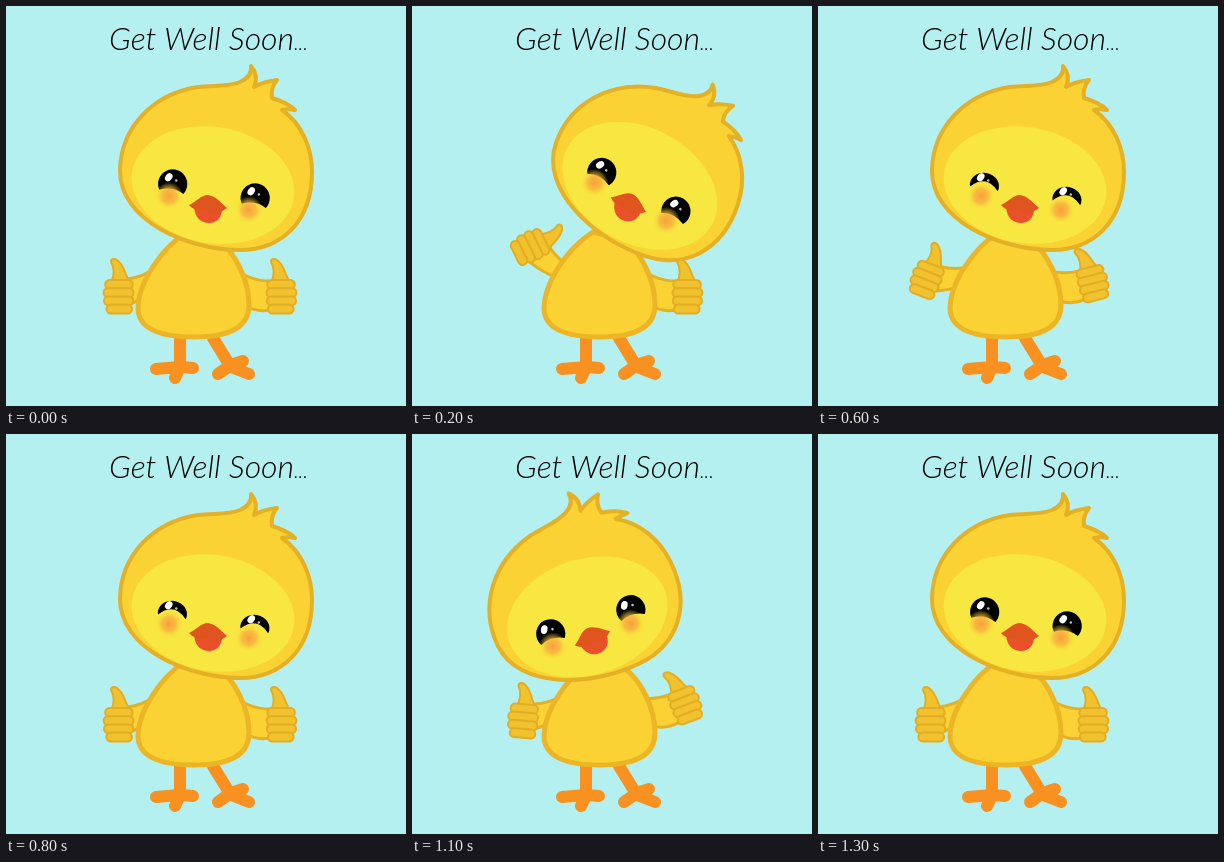
An HTML page that plays this animation: 400 by 400 pixels, repeating every 1400 ms.

```html
<!DOCTYPE html>
<html lang="en">
<head>
<meta charset="utf-8">
<title>Get Well Soon</title>
<style>
  html, body { margin: 0; width: 100%; height: 100%; overflow: hidden; background: #b5f0f0; }
  svg { display: block; width: 100%; height: 100%; }
  text { font: italic 300 32px Lato, "Open Sans", sans-serif; }
  .skin { fill: #fad233; stroke: #e4b026; stroke-width: 4; stroke-linejoin: round; }
  .body { stroke: #ebb526; stroke-width: 5; }
  .arm { stroke-width: 3; }
  .hand { fill: #f1c22d; stroke: #e2ad24; stroke-width: 2; stroke-linejoin: round; }
  .legs { fill: none; stroke: #f8911f; stroke-width: 12; stroke-linecap: round; stroke-linejoin: round; }
</style>
</head>
<body>
<svg viewBox="0 0 400 400">
  <defs>
    <radialGradient id="blush">
      <stop offset="0" stop-color="#f9a03a"/>
      <stop offset=".5" stop-color="#f9b040" stop-opacity=".8"/>
      <stop offset="1" stop-color="#f8e23f" stop-opacity="0"/>
    </radialGradient>
    <clipPath id="lid"><path class="lid"/></clipPath>
    <path id="thumb" d="M105 277C109 268 108 261 105 256C105 252 110 252 113 256C119 261 119 270 124 276Z"/>
    <g id="fist"></g>
    <g id="eye">
      <path class="lid"/>
      <g clip-path="url(#lid)" fill="#fff">
        <ellipse cx="-5" cy="-4" rx="3.3" ry="4.4" transform="rotate(28 -5 -4)"/>
        <circle cx="3" cy="-2" r="1.3" opacity=".75"/>
      </g>
    </g>
    <g id="cheek"><circle r="14" fill="url(#blush)"/></g>
  </defs>

  <rect width="400" height="400" fill="#b5f0f0"/>
  <text x="103" y="44">Get Well Soon<tspan font-size="20">...</tspan></text>

  <g class="legs">
    <path d="M174 332V360M150 363L174 361L169 372M176 361L187 362"/>
    <path d="M207 332L223 358M212 368L225 359L237 355M225 361L243 368"/>
  </g>

  <g id="left">
    <path class="skin arm" d="M163 245C157 258 143 270 122 273L127 297Q140 291 152 280Z"/>
    <use href="#thumb" class="hand"/>
    <use href="#fist" class="hand"/>
  </g>
  <g id="right">
    <path class="skin arm" d="M226 260C238 271 250 275 264 275V304Q250 307 236 298Z"/>
    <use href="#thumb" class="hand" x="160"/>
    <use href="#fist" class="hand" transform="matrix(-1 0 0 1 388 0)"/>
  </g>

  <path class="skin body" d="M181 226C154 243 132 278 132 303C133 325 158 331 188 331C219 331 243 323 243 299C243 274 229 246 212 234Z"/>

  <g id="head">
    <path class="skin" d="M114 164C115 122 146 88 192 81C208 79 222 81 234 76C243 72 246 67 245 60C251 67 251 74 248 81C256 76 263 75 271 74C266 80 265 86 266 92C273 94 283 98 289 104C284 103 280 103 276 104C296 118 306 142 306 166C306 217 274 244 234 244C181 244 113 214 114 164Z"/>
    <ellipse cx="207" cy="179" rx="82" ry="58" transform="rotate(9.7 207 179)" fill="#f8e740"/>
    <use href="#eye" transform="translate(167 176) rotate(9.7)"/>
    <use href="#eye" transform="translate(249.5 190) rotate(9.7)"/>
    <use href="#cheek" x="163" y="190"/>
    <use href="#cheek" x="243" y="204"/>
    <path d="M188 201C189 212 195 217 203 217C211 217 216 211 216 203Z" fill="#ea512b"/>
    <path d="M183 199C190 196 195 189 202 189C210 190 215 197 221 202C213 208 207 209 203 206C196 204 189 206 183 199Z" fill="#e0541f"/>
  </g>
</svg>
<script>
  const LOOP = 1400, STEP = 100;
  const $ = id => document.getElementById(id);
  const lids = document.querySelectorAll(".lid");

  // Four stacked fingers, longest in the middle
  for (let i = 0; i < 4; i++) {
    const finger = document.createElementNS("http://www.w3.org/2000/svg", "rect");
    const inset = (i - 1.3) ** 2;
    const box = { x: 97.5 + inset, y: 274 + 8.2 * i, width: 30 - 1.5 * inset, height: 9, rx: 4.5 };
    for (const key in box) finger.setAttribute(key, box[key]);
    $("fist").append(finger);
  }

  // Rises from 0 to 1 at the peak, then falls back to 0
  function pulse(t, peak, rise, fall = rise) {
    return Math.max(0, 1 - (t < peak ? (peak - t) / rise : (t - peak) / fall));
  }

  const mix = (a, b, u) => a + (b - a) * u;

  function eyePath(shut) {
    const rx = 14.6, ry = mix(14.6, 12.5, shut);
    const w = mix(12.2, 14, shut), y = mix(10, 7, shut);
    return `M${-w} ${y}A${rx} ${ry} 0 1 1 ${w} ${y}Q0 ${mix(4, -8, shut)} ${-w} ${y}Z`;
  }

  function turn(id, angle, x, y, dx = 0, dy = 0) {
    $(id).setAttribute("transform", `translate(${dx} ${dy}) rotate(${angle} ${x} ${y})`);
  }

  function draw(time) {
    const t = Math.floor(time % LOOP / STEP) * STEP;
    const toRight = pulse(t, 200, 200);
    const toLeft = pulse(t, 1100, 200) ** 1.15;
    const wave = pulse(t, 200, 200, 600);
    const lift = pulse(t, 500, 300) + pulse(t, 1100, 300, 200);
    const shut = Math.min(1, 2 * pulse(t, 600, 400, 500));

    turn("head", 18 * toRight - 26.4 * toLeft, 208, 183, 19.5 * toRight - 30 * toLeft, toRight + 3 * toLeft);
    turn("left", 64 * wave + 5 * toLeft, 155, 270);
    turn("right", -21 * lift, 222, 285);
    lids.forEach(lid => lid.setAttribute("d", eyePath(shut)));
  }

  const start = performance.now();
  function tick() {
    draw(performance.now() - start);
    requestAnimationFrame(tick);
  }
  tick();
</script>
</body>
</html>
```
